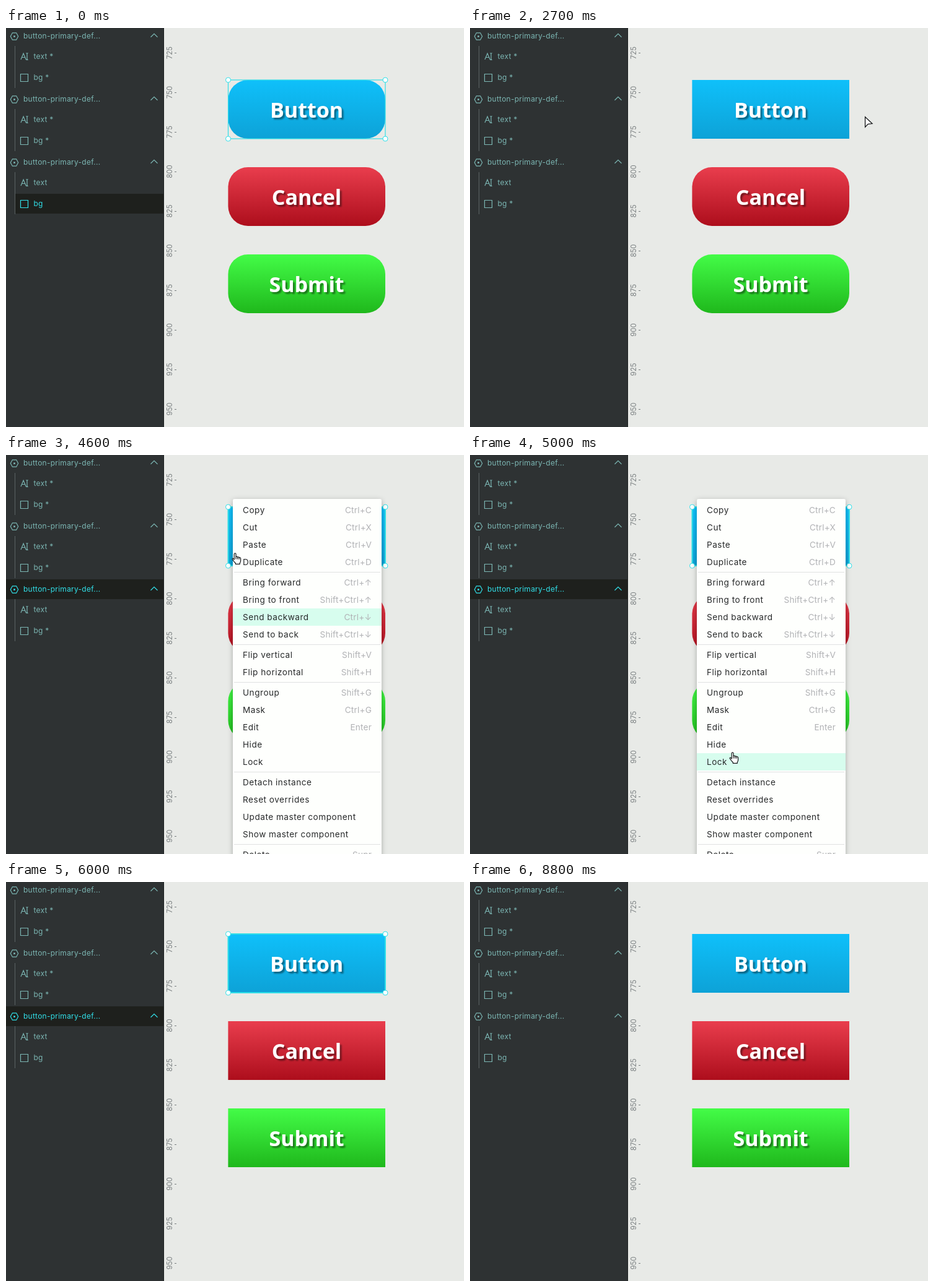
Write an HTML page that moves like this. It is 739x645 px and loops after 9.2 s.

```html
<!DOCTYPE html>
<html lang="en">
<head>
<meta charset="utf-8">
<title>Component overrides</title>
<style>
html, body { margin: 0; width: 100%; height: 100%; overflow: hidden; background: #e8eae7; }
svg { display: block; width: 739px; height: 645px; }
text { font-family: Inter, Roboto, sans-serif; white-space: pre; }
.row { --c: #7bb5b2; }
.row.on { --c: #31dfe8; }
.row text { font-size: 12px; letter-spacing: .25px; fill: var(--c); }
.row path { fill: none; stroke: var(--c); stroke-width: 1.2; }
.row circle { fill: var(--c); }
.row .back { fill: #1e201d; display: none; }
.row.on .back { display: inline; }
.ruler { font-size: 11.5px; fill: #7b8082; text-anchor: middle; }
.label { font: bold 34px "Open Sans", "Noto Sans", sans-serif; fill: #fff; text-anchor: middle; }
.item { font-size: 13.6px; letter-spacing: .5px; fill: #27292a; }
.key { font-size: 13.6px; letter-spacing: .2px; fill: #b1b2b5; text-anchor: end; }
</style>
</head>
<body>
<svg id="stage" viewBox="0 0 739 645">
  <defs>
    <filter id="textShadow" x="-10%" y="-20%" width="125%" height="150%">
      <feDropShadow dx="3" dy="3" stdDeviation="1.3" flood-color="#000" flood-opacity=".42"/>
    </filter>
    <filter id="menuShadow" x="-10%" y="-5%" width="120%" height="110%">
      <feDropShadow dx="0" dy="2" stdDeviation="4" flood-color="#000" flood-opacity=".28"/>
    </filter>
  </defs>
  <rect width="739" height="645" fill="#e8eae7"/>
  <rect width="255" height="645" fill="#2e3233"/>
  <rect x="254" width="1" height="645" fill="#1b1e1f"/>
</svg>
<script>
const LOOP = 9200;
const stage = document.getElementById('stage');

function add(parent, tag, attrs = {}, text) {
  const el = document.createElementNS('http://www.w3.org/2000/svg', tag);
  for (const k in attrs) el.setAttribute(k, attrs[k]);
  if (text !== undefined) el.textContent = text;
  parent.append(el);
  return el;
}
const show = (el, on) => el.setAttribute('display', on ? 'inline' : 'none');

// Layer tree
const ICONS = {
  group: 'M10.4 -5.2H16.6L19.7 .5L16.6 6.2H10.4L7.3 .5Z',
  text: 'M24 5L28.1 -5L32.2 5M25.5 1.5H30.7M32.3 -5.5Q34 -5.5 34 -4V4Q34 5.5 32.3 5.5M34 -4Q34 -5.5 35.7 -5.5M34 4Q34 5.5 35.7 5.5',
  bg: 'M23.5 -5.5H35.5V6.5H23.5Z'
};
function row(kind, y, label) {
  const g = add(stage, 'g', { class: 'row', transform: `translate(0 ${y})` });
  const head = kind === 'group';
  add(g, 'rect', { class: 'back', x: head ? 0 : 15, y: head ? -16 : -16, width: head ? 254 : 239, height: 32 });
  add(g, 'path', { d: ICONS[kind] });
  if (head) {
    add(g, 'circle', { cx: 13.5, cy: .5, r: 1.5 });
    add(g, 'path', { d: 'M233.5 1.7L239 -3.6L244.5 1.7' });
  }
  const t = add(g, 'text', { x: head ? 28 : 44.5, y: 4.2 }, label);
  return { g, t };
}
let head, bg;
for (let i = 0; i < 3; i++) {
  const y = i * 102;
  const star = i < 2 ? ' *' : '';
  head = row('group', y + 13, 'button-primary-def...');
  row('text', y + 46, 'text' + star);
  bg = row('bg', y + 80, 'bg' + star);
  add(stage, 'path', { d: `M14.5 ${y + 29}V${y + 97}`, stroke: '#5b6263' });
}

// Ruler
for (let i = 0; i < 10; i++) {
  const y = 40 + i * 64;
  add(stage, 'text', { class: 'ruler', transform: `translate(267.7 ${y}) rotate(-90)` }, 725 + i * 25);
  add(stage, 'path', { d: `M272 ${y + .5}h3`, stroke: '#7b8082' });
}

// Buttons
const buttons = [
  ['Button', '#0fc0fa', '#0da2d7'],
  ['Cancel', '#e93d4d', '#ad0e1c'],
  ['Submit', '#43fc47', '#1fb81c']
].map(([label, top, bottom], i) => {
  const y = 84 + i * 141;
  const grad = add(stage.querySelector('defs'), 'linearGradient', { id: 'fill' + i, x2: 0, y2: 1 });
  add(grad, 'stop', { 'stop-color': top });
  add(grad, 'stop', { offset: 1, 'stop-color': bottom });
  const box = add(stage, 'rect', { x: 358.4, y, width: 253.6, height: 95, fill: `url(#fill${i})` });
  add(stage, 'text', { class: 'label', x: 485, y: y + 61.3, filter: 'url(#textShadow)' }, label);
  return box;
});

// Selection outline and handles
const outline = add(stage, 'rect', { x: 358.5, y: 84, width: 253.5, height: 95, fill: 'none', stroke: '#31dfe8' });
const handles = add(stage, 'g', { fill: '#fff', stroke: '#31dfe8' });
for (const cx of [358.5, 612]) for (const cy of [84, 179]) add(handles, 'circle', { cx, cy, r: 4 });

// Context menu
const GROUPS = [
  'Copy|Ctrl+C,Cut|Ctrl+X,Paste|Ctrl+V,Duplicate|Ctrl+D',
  'Bring forward|Ctrl+↑,Bring to front|Shift+Ctrl+↑,Send backward|Ctrl+↓,Send to back|Shift+Ctrl+↓',
  'Flip vertical|Shift+V,Flip horizontal|Shift+H',
  'Ungroup|Shift+G,Mask|Ctrl+G,Edit|Enter,Hide,Lock',
  'Detach instance,Reset overrides,Update master component,Show master component',
  'Delete|Supr'
];
const menu = add(stage, 'g');
add(menu, 'rect', { x: 366, y: 71, width: 240, height: 600, rx: 3, fill: '#fefffd', filter: 'url(#menuShadow)' });
const hot = add(menu, 'rect', { x: 366, width: 240, height: 28, fill: '#d7fdee' });
const itemY = [];
let y = 89;
GROUPS.forEach((group, i) => {
  if (i) add(menu, 'path', { d: `M368 ${y - 16.5}H604`, stroke: '#e0e1e2' });
  for (const entry of group.split(',')) {
    const [name, key] = entry.split('|');
    itemY.push(y);
    add(menu, 'text', { class: 'item', x: 382, y: y + 5 }, name);
    if (key) add(menu, 'text', { class: 'key', x: 590, y: y + 5 }, key);
    y += 28;
  }
  y += 5;
});

// Pointers
const arrow = add(stage, 'path', { d: 'M.6 .8V17.2L5.2 12.4L12 11.6Z', fill: '#fff', stroke: '#16181a', 'stroke-width': 1.3 });
const hand = add(stage, 'path', {
  d: 'M4.2 11.5V2.3Q4.2 .8 5.6 .8T7 2.3V6.8Q7.2 5.9 8.4 6.1T9.6 7.4Q9.9 6.6 11 6.8T12.1 8.1Q12.6 7.4 13.6 7.8T14.6 9.2V13Q14.6 15.3 13.3 16.7V18.3H6.3V16.8Q4 14.8 2.4 12.2Q.5 9.9 1.6 9.2T4.2 11.5M7 6.8V10.5M9.6 7.4V10.5M12.1 8.1V10.8',
  fill: '#fff', stroke: '#16181a', 'stroke-width': 1.2, 'stroke-linejoin': 'round'
});

// Pointer moves: start, end, from x, y, to x, y
const MOVES = [
  [2200, 2500, 697, 145, 639, 143],
  [2700, 3400, 637, 143, 374, 98],
  [3600, 3900, 373, 97, 367, 92],
  [4400, 4400, 361, 88, 361, 88],
  [4600, 5000, 364, 158, 418, 480],
  [5000, 5400, 418, 480, 462, 577],
  [5800, 5800, 427, 577, 427, 577],
  [6400, 6600, 432, 579, 375, 551],
  [7000, 7000, 370, 545, 370, 545],
  [8100, 8600, 362, 535, 65, 631]
];
// Menu items lit in turn while the pointer runs down the list
const HOT = [6, 9, 11, 13, 14, 15, 16, 17, 17];

function pointer(t) {
  const move = MOVES.filter(m => m[0] <= t).pop();
  if (!move || (t >= 6000 && t < 6400) || t >= 8800) return null;
  const [a, b, x0, y0, x1, y1] = move;
  const u = b > a ? Math.min(1, (t - a) / (b - a)) : 1;
  const e = u * u * (3 - 2 * u);
  return { x: x0 + (x1 - x0) * e, y: y0 + (y1 - y0) * e };
}

function draw(ms) {
  const t = Math.floor(ms / 100) * 100;
  const p = pointer(t);
  const open = t >= 4000 && t < 6000;
  const groupOn = t >= 4000 && t < 7800;
  const bgOn = t < 2700;
  const hover = t >= 2700 && t < 4000 && p.x < 612;

  buttons.forEach((b, i) => b.setAttribute('rx', t < (i ? 6000 : 1500) ? 32 : 0));
  head.g.classList.toggle('on', groupOn);
  bg.g.classList.toggle('on', bgOn);
  bg.t.textContent = t >= 1500 && t < 6000 ? 'bg *' : 'bg';

  show(outline, groupOn || bgOn || hover);
  outline.setAttribute('stroke-width', groupOn ? 2 : 1.2);
  show(handles, groupOn || bgOn);

  show(menu, open);
  show(hot, t >= 4400);
  const item = t < 4600 ? 0 : HOT[Math.min(HOT.length - 1, (t - 4600) / 100)];
  hot.setAttribute('y', itemY[item] - 14);

  const isHand = t >= 4400 && t < 6000;
  show(arrow, p && !isHand);
  show(hand, p && isHand);
  if (p) (isHand ? hand : arrow).setAttribute('transform', `translate(${p.x} ${p.y})`);
}

const start = performance.now();
function tick() {
  draw((performance.now() - start) % LOOP);
  requestAnimationFrame(tick);
}
tick();
</script>
</body>
</html>
```
